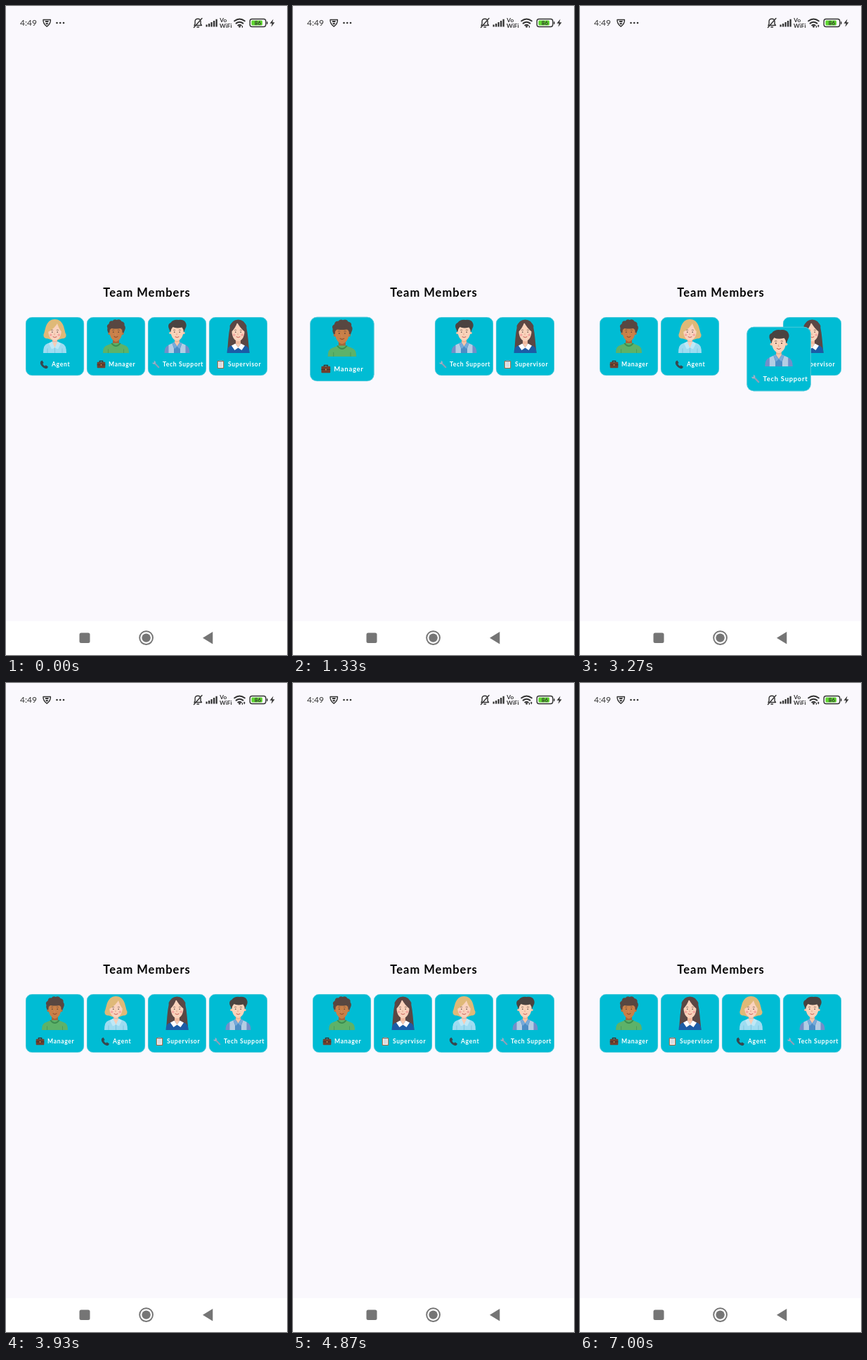
An HTML page that plays this animation: 400 by 922 pixels, repeating every 7070 ms.

```html
<!DOCTYPE html>
<html lang="en">
<head>
<meta charset="utf-8">
<title>Team Members</title>
<style>
html, body { margin: 0; width: 100%; height: 100%; overflow: hidden; background: #faf8fd; }
svg { display: block; width: 400px; height: 922px; }
text { font-family: Lato, sans-serif; }
.title { font-size: 16.5px; font-weight: 700; letter-spacing: 1px; text-anchor: middle; }
.label { font-size: 8.6px; font-weight: 700; letter-spacing: .65px; fill: #fff; }
.status { fill: #333; }
.line { fill: none; stroke: #333; stroke-width: 1.4; stroke-linecap: round; stroke-linejoin: round; }
.wifi { stroke-width: 2; }
.nav { fill: #757575; }
</style>
</head>
<body>
<svg viewBox="0 0 400 922">
  <defs>
    <g id="tile">
      <rect x="-41.5" y="-41.5" width="83" height="83" rx="9" fill="#00bcd4"/>
      <rect x="-41.2" y="-41.2" width="82.4" height="82.4" rx="8.7" fill="none" stroke="#7fd2de" stroke-width=".6"/>
    </g>
    <g id="face">
      <g fill="#4a3a35"><circle cx="-3.7" cy="-20.3" r=".8"/><circle cx="3.7" cy="-20.3" r=".8"/></g>
      <path d="M-5.4-22.8q1.6-1 3-.2M5.4-22.8q-1.6-1-3-.2" fill="none" stroke="#6a5045" stroke-width=".7"/>
      <path d="M-.3-18.8l-.5 2.4h1.4" fill="none" stroke="#d08e70" stroke-width=".5"/>
    </g>
    <path id="smile" d="M-2.8-13.8q2.8 2.4 5.6 0" fill="none" stroke="#c2504a" stroke-width=".9"/>
    <g id="blush" fill="#f4a6a0"><circle cx="-5.8" cy="-16.3" r="1.7"/><circle cx="5.8" cy="-16.3" r="1.7"/></g>
  </defs>

  <rect width="400" height="922" fill="#faf8fd"/>
  <rect y="874" width="400" height="48" fill="#fff"/>

  <!-- status bar -->
  <g class="status">
    <text x="20" y="28" font-size="12">4:49</text>
    <path class="line" d="M53 19.5h10.4q.5 5.4-5.2 9.7q-5.7-4.3-5.2-9.7z"/>
    <path d="M55.5 21h5.4l-.8 2h-3.800zM56 24h4.400l-2.200 3z"/>
    <circle cx="72.5" cy="24" r="1.3"/><circle cx="77.2" cy="24" r="1.3"/><circle cx="82" cy="24" r="1.3"/>
    <path class="line" d="M268 27.500h10.500l-1.400-2v-3.500q0-3.800-4-3.800t-4 3.800v3.500zM272 30h2.500M267.500 30.500l11.500-13"/>
    <path d="M284.500 26.500h2.300v3h-2.300zM288 25h2.300v4.500h-2.300zM291.500 23h2.300v6.500h-2.300zM295 21h2.300v8.500h-2.300zM298.500 18.800h2.300v10.700h-2.300z"/>
    <g font-size="8.3" font-weight="700"><text x="304.3" y="23">Vo</text><text x="304" y="31.2">WiFi</text></g>
    <path class="line wifi" d="M325.2 21.3q7.300-5.600 14.600 0M327.600 24.600q4.900-3.800 9.800 0M330.200 27.500q2.300-1.700 4.600 0"/>
    <circle cx="332.5" cy="29.3" r="1.400"/>
    <path d="M335.800 28h1.300v2.800h-1.300z"/>
    <path id="traffic" d="M338 28l1.300-1.500 1.300 1.500-1.300 2.500z"/>
    <rect class="line" x="347.2" y="18.5" width="22.600" height="11" rx="3"/>
    <rect x="371" y="22" width="1.5" height="4" rx=".7"/>
    <rect x="349.4" y="20.6" width="15.6" height="6.8" rx="1.3" fill="#5ed62f"/>
    <text x="353.8" y="27.2" font-size="8" font-weight="700">86</text>
    <path d="M380.500 18.500l-5 6.300h3.200l-1.200 5 5-6.600h-3.200z"/>
  </g>

  <text class="title" x="200.6" y="412.6">Team Members</text>

  <!-- cards, each centred on its own origin -->
  <g id="supervisor">
    <use href="#tile"/>
    <path d="M-15.500 9.500C-14.500-4-14-17-11.500-28Q-9-38 0-38T11.500-28C14-17 14.500-4 16 9.500z" fill="#5b4744"/>
    <path d="M-3.500-12h7v10h-7z" fill="#efb89d"/>
    <path d="M-16 9.500q0-9 6-10.500l6-2h8l6 2q6 1.500 6 10.500z" fill="#1b5ca6"/>
    <path d="M-3.500-3.500h7L0 2.500z" fill="#f6c9b0"/>
    <path d="M-4-4l4 6-5 3.500-4.500-6.500zM4-4L0 2l5 3.500 4.500-6.500z" fill="#fff"/>
    <path d="M-9-26Q-7-33 0-33T9-26Q10-9.500 0-7Q-10-9.500-9-26z" fill="#f9d2bb"/>
    <path d="M-1-35Q-4-25-10.500-20L-12-29Q-8-37-1-35zM-2-35Q3-25 10.500-20L12-29Q8-37-2-35z" fill="#5b4744"/>
    <use href="#blush"/><use href="#face"/><use href="#smile"/>
    <g transform="translate(-25 25.7)">
      <rect x="-4.7" y="-5.2" width="9.4" height="11" rx="1" fill="#a86b48"/>
      <path d="M-3.600-4h7.200v8.700h-7.200z" fill="#f1f2f4"/>
      <path d="M-2.200-5.900h4.400v2.400h-4.400z" fill="#8b949b"/>
      <path d="M-2.400-1.500h4.800M-2.400.5h4.800M-2.400 2.500h4.800" stroke="#a7afb7" stroke-width=".7"/>
    </g>
    <text class="label" x="-14.5" y="28.6">Supervisor</text>
  </g>

  <g id="agent">
    <use href="#tile"/>
    <path d="M-10-11Q-17-11-16-17C-13-22-14-38 0-38.500C14-38 13-22 16-17Q17-11 10-11L4-9h-8z" fill="#dfb978"/>
    <path d="M-3.500-13h7v11h-7z" fill="#efb9a1"/>
    <path d="M-16.500 9.500q0-12 6-13.500l6.500-2.500h8l6.500 2.500q6 1.500 6 13.500z" fill="#9edcf1"/>
    <path d="M-4-6h8L0 2z" fill="#f8cdb6"/>
    <path d="M-4-7L0 2l-4.500 2-4-8zM4-7L0 2l4.500 2 4-8z" fill="#bfe8f6"/>
    <path d="M0 2v7.500M-10.500 3v6.500M10.500 3v6.500" stroke="#70bfdc" stroke-width=".7"/>
    <path d="M-9.300-25Q-7-33 0-33T9.300-25Q10-10.500 0-7.500Q-10-10.500-9.300-25z" fill="#f9d2be"/>
    <path d="M5-35Q0-25-10.500-20L-12-28Q-7-38 5-35zM3-35Q5-25 10.500-20L12-28Q9-37 3-35z" fill="#dfb978"/>
    <use href="#blush"/><use href="#face"/><use href="#smile"/>
    <path transform="translate(-14.8 25.7)" d="M-5.300-4.500l2.200-1.100 2 3.300-1.300 1.300q1 2.200 3 3.200l1.400-1.200 3.300 2.200-1.100 2.200q-3.400 1.800-7.400-2.300T-5.300-4.500z" fill="#37474f"/>
    <text class="label" x="-4.5" y="28.6">Agent</text>
  </g>

  <g id="manager">
    <use href="#tile"/>
    <path d="M-4.500-12h9v11h-9z" fill="#a5673b"/>
    <path d="M-18.500 9.500q0-9.500 6-11l7.500-3h10l7.500 3q6 1.500 6 11z" fill="#5db269"/>
    <path d="M-5.500-5Q0 2 5.500-5l1.500 1Q0 5-7-4z" fill="#3d8d4f"/>
    <path d="M-11 4v5.500M11 4v5.500" stroke="#429457" stroke-width=".7"/>
    <path d="M-10-18q-3-4-2-8-2-4 2-6 1-5 5-4 3-3.500 6-1.500 5-2 7 2 5 1 4 5.500 2.500 3 .5 7l-2 5z" fill="#584741"/>
    <circle cx="-9.300" cy="-18" r="1.800" fill="#b9733f"/><circle cx="9.300" cy="-18" r="1.800" fill="#b9733f"/>
    <path d="M-9-25Q-5-29 0-28.500T9-25Q10-10 0-6.500Q-10-10-9-25z" fill="#c98048"/>
    <path d="M-9.500-21l.5-7q8-3 18 0l.5 7q-1-4-3.500-4.500-6 1-12 0-2.500.5-3.500 4.500z" fill="#584741"/>
    <use href="#face"/>
    <path d="M-2.800-14q2.800 2.400 5.600 0" fill="none" stroke="#8a4428" stroke-width="1"/>
    <g transform="translate(-21 25.8)">
      <path d="M-2.200-3v-2h4.400v2" fill="none" stroke="#3d2a27" stroke-width="1.2"/>
      <rect x="-5.8" y="-3.6" width="11.600" height="8.600" rx="1" fill="#70402f"/>
      <path d="M-5.800 0h11.600v1h-11.600z" fill="#43302c"/>
      <path d="M-.7-.2h1.400v1.600h-1.400z" fill="#d9a04a"/>
    </g>
    <text class="label" x="-10.5" y="28.6">Manager</text>
  </g>

  <g id="tech">
    <use href="#tile"/>
    <path d="M-3.500-12h7v10h-7z" fill="#eab596"/>
    <path d="M-18 9.500q0-9 5.500-11l8-3.500h9l8 3.500q5.500 2 5.500 11z" fill="#718fc9"/>
    <path d="M-8-3.500l3.500-2h9l3.500 2 .5 13h-17z" fill="#4b8dc6"/>
    <path d="M-12-2l5-2.300 2.500 7v6.800h-7.500zM12-2L7-4.300 4.500 2.700v6.800H12z" fill="#b3cde4"/>
    <path d="M-4-6h8L0 0z" fill="#f6c7aa"/>
    <path d="M-4.500-6L0 0l-3.500 3.500-3.500-8zM4.500-6L0 0l3.500 3.500 3.500-8z" fill="#77abda"/>
    <circle cx="-9.500" cy="-19" r="1.800" fill="#f2c2a5"/><circle cx="9.500" cy="-19" r="1.800" fill="#f2c2a5"/>
    <path d="M-9.200-26Q-6-32 0-31T9.200-26Q10-10.500 0-7.500Q-10-10.500-9.200-26z" fill="#f9d2b9"/>
    <path d="M-9.500-20l-2.700-7q-1-5 3-6.500 4-5 11-4 8-1 10.500 4 2 4-.5 8l-2.300 5.500q-.2-4.500-2.500-7-8 2-13-.5-3 3-3.500 7.500z" fill="#4a4340"/>
    <use href="#face"/><use href="#smile"/>
    <g transform="translate(-30 25.7)">
      <path d="M-2.500-2.500L3.800 4" stroke="#8f9fb8" stroke-width="2.2" stroke-linecap="round"/>
      <path d="M-3.200-5.200q3 .2 2.600 3-.5 2.200-2.600 1.800-2 0-2-2.600l1.800 1 1.300-1.300z" fill="#a4b0c6"/>
    </g>
    <text class="label" x="-20.5" y="28.6">Tech Support</text>
  </g>

  <!-- navigation bar -->
  <g class="nav">
    <rect x="104.5" y="890.5" width="15" height="14.5" rx="2.5"/>
    <circle cx="199.6" cy="897.6" r="9.4" fill="none" stroke="#757575" stroke-width="1.9"/>
    <circle cx="199.6" cy="897.6" r="6.2"/>
    <path d="M280 897.700l14.300-8.700v17.400z"/>
  </g>
</svg>
<script>
const LOOP = 7070, REST_Y = 483.5, LIFT = 1.1;
const slot = i => 69.5 + 87 * i;
const DROP = [1400, 3700, 4730];

// [time, x, y]; a row with a y is a lifted card, equal times are a hard jump
const tracks = {
  manager: [
    [0, slot(1)], [660, slot(1)],
    [660, slot(1), 483.5], [790, slot(1), 483.5], [880, 142, 498], [1000, 115.5, 518],
    [1060, 108, 518], [1180, 82, 507], [1300, 70, 489], [DROP[0], 69.5, 484],
    [DROP[0], slot(0)]
  ],
  tech: [
    [0, slot(2)], [3270, slot(2)],
    [3270, 283, 501.5], [3310, 284, 501.5], [3400, 315, 494], [3500, 343, 481],
    [3570, 352, 476], [DROP[1], 345, 477],
    [DROP[1], slot(3)]
  ],
  agent: [
    [0, slot(0)], [DROP[0], slot(0)],
    [DROP[0], slot(1)], [4270, slot(1)],
    [4270, 178, 502], [4330, 188, 514], [4450, 212, 527], [4570, 235, 513],
    [4660, 243, 492], [DROP[2], 244, 481],
    [DROP[2], slot(2)]
  ],
  supervisor: [
    [0, slot(3)], [DROP[1], slot(3)],
    [DROP[1], slot(2)], [DROP[2], slot(2)],
    [DROP[2], slot(1)]
  ]
};

const loop = (id, frames) =>
  document.getElementById(id).animate(frames, { duration: LOOP, iterations: Infinity });

for (const [id, rows] of Object.entries(tracks)) {
  const last = rows[rows.length - 1];
  loop(id, [...rows, [LOOP, ...last.slice(1)]].map(([t, x, y]) => ({
    offset: t / LOOP,
    transform: `translate(${x}px, ${y ?? REST_Y}px) scale(${y ? LIFT : 1})`
  })));
}

const on = 1930 / LOOP;
loop("traffic", [
  { offset: 0, opacity: 0 }, { offset: on, opacity: 0 },
  { offset: on, opacity: 1 }, { offset: 1, opacity: 1 }
]);
</script>
</body>
</html>
```
